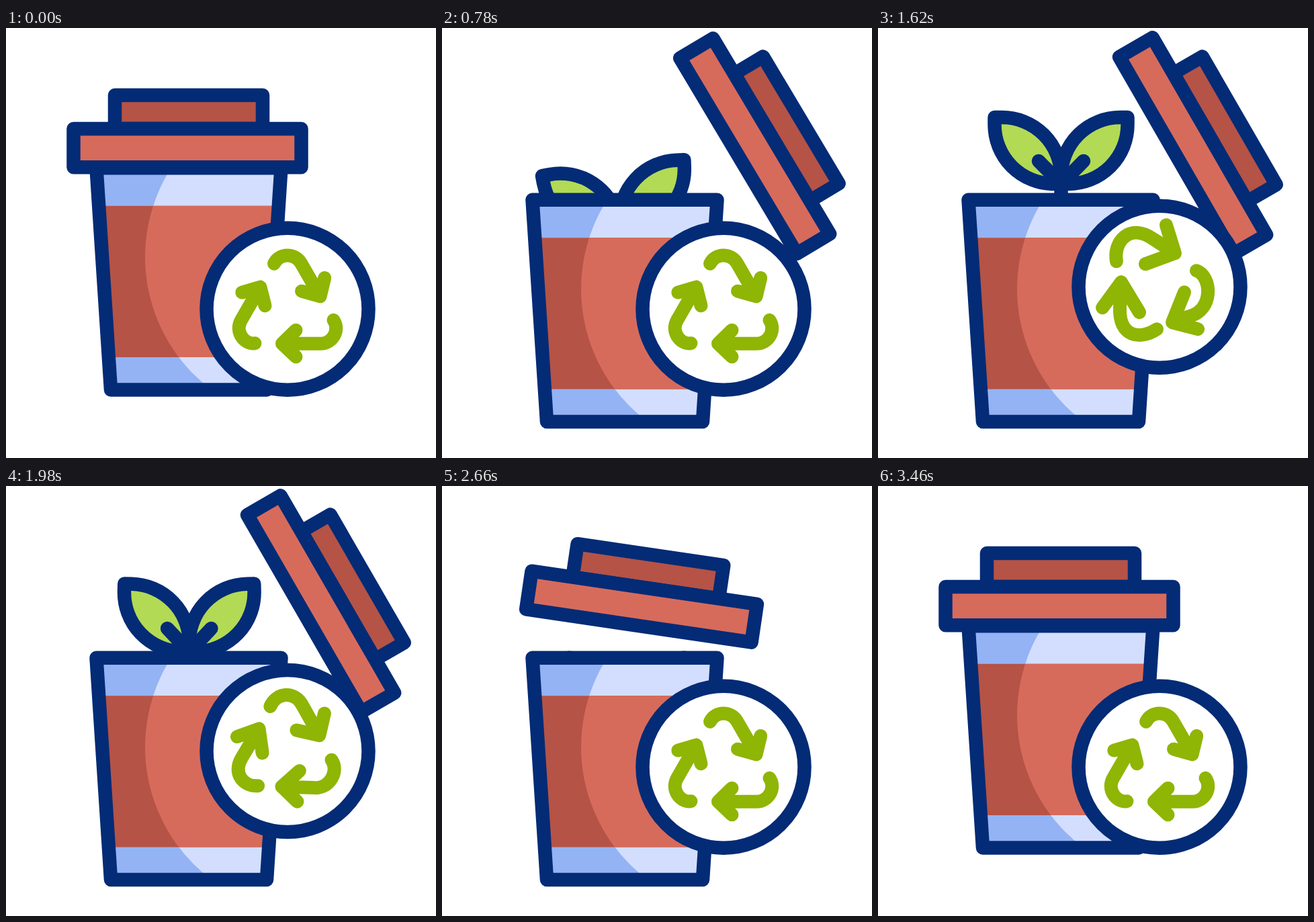
Write an HTML page that moves like this. It is 640x640 px and loops after 3.6 s.

```html
<!DOCTYPE html>
<html lang="en">
<head>
<meta charset="utf-8">
<title>Recyclable cup</title>
<style>
  html, body { margin: 0; width: 100%; height: 100%; overflow: hidden; background: #fff; }
  svg { display: block; width: 100vw; height: 100vh; }
  .line { stroke: #042b76; stroke-width: 20.5; stroke-linecap: round; stroke-linejoin: round; fill: none; }
  .arrows { stroke: #8fb505; stroke-width: 20; stroke-linecap: round; stroke-linejoin: round; fill: none; }
</style>
</head>
<body>
<svg viewBox="0 0 640 640">
  <defs>
    <clipPath id="aboveRim"><rect width="640" height="256"/></clipPath>
    <clipPath id="cupShape"><path d="M134.5 208.3H409.5L388 538.6H156Z"/></clipPath>
    <clipPath id="band"><rect x="120" y="264.7" width="300" height="225.3"/></clipPath>
    <g id="leaf" class="line">
      <path fill="#b2da54" d="M173.5 133H184.5A88 88 0 0 1 272.5 221V232H261.5A88 88 0 0 1 173.5 144Z"/>
      <path d="M239 198L272.5 232"/>
    </g>
  </defs>

  <g clip-path="url(#aboveRim)">
    <g id="plant">
      <path class="line" d="M272.5 232V290"/>
      <g id="leafL"><use href="#leaf"/></g>
      <g id="leafR"><use href="#leaf" transform="translate(545 0) scale(-1 1)"/></g>
    </g>
  </g>

  <g id="cup">
    <g clip-path="url(#cupShape)">
      <rect x="120" y="200" width="300" height="350" fill="#94b3f4"/>
      <circle cx="453.5" cy="341" r="246.5" fill="#d3deff"/>
      <g clip-path="url(#band)">
        <rect x="120" y="250" width="300" height="250" fill="#b55346"/>
        <circle cx="453.5" cy="341" r="246.5" fill="#d66b5c"/>
      </g>
    </g>
    <path class="line" d="M134.5 208.3H409.5L388 538.6H156Z"/>
  </g>

  <g id="lid" class="line">
    <path fill="#b55346" d="M162 150V100H382V150Z"/>
    <path fill="#d66b5c" d="M100.5 150H439.5V207.3H100.5Z"/>
  </g>

  <g id="badge">
    <circle class="line" style="fill:#fff" r="120.5"/>
    <g class="arrows"><path/><path/><path/></g>
  </g>
</svg>

<script>
const LOOP = 3600;
const $ = id => document.getElementById(id);
const paths = document.querySelectorAll('.arrows path');

// Eased progress from 0 to 1 between two times
const ease = (t, from, to) => {
  const x = Math.min(1, Math.max(0, (t - from) / (to - from)));
  return x * x * (3 - 2 * x);
};

const turn = ([x, y], deg) => {
  const a = deg * Math.PI / 180, c = Math.cos(a), s = Math.sin(a);
  return [x * c - y * s, x * s + y * c];
};

// Arrow points: tail, two curve handles, curve end, tip, inner barb, outer barb
const rest = [[68.5, 16.5], [78.6, 31.4], [67, 51.5], [49, 51.5], [-8, 51.5], [12.5, 31.5], [12.5, 71]];
const spun = [
  [[-4, 63], [-28, 79], [-61, 76], [-59, 30], [-57, -7], [-30, 38], [-85, 31]],
  [[-64, -38], [-69, -67], [-45, -96], [-9, -71], [23, -50], [-21, -34], [10, -92]],
  [[55, -24], [78, -16], [81, 35], [44, 44], [19, 53], [37, 8], [57, 63]]
];
// Same points with the rotation taken out, so they can be blended with the rest shape
const loose = spun.map((pts, k) => pts.map(p => turn(p, -120 * k - 90)));

function arrowPath(k, angle, blend) {
  const [tail, h1, h2, end, tip, inner, outer] = rest.map(([x, y], i) => {
    const [u, v] = loose[k][i];
    return turn([x + (u - x) * blend, y + (v - y) * blend], 120 * k + angle)
      .map(n => n.toFixed(2));
  });
  return `M${tail}C${h1} ${h2} ${end}L${tip}M${inner}L${tip}L${outer}`;
}

const move = (id, value) => $(id).setAttribute('transform', value);

function draw(t) {
  const drop = 47.5 * (ease(t, 0, 480) - ease(t, 2800, 3280));
  move('cup', `translate(0 ${drop})`);

  const lid = ease(t, 0, 840) - ease(t, 2240, 2790);
  move('lid', `translate(${220.4 * lid} ${9.4 * lid}) rotate(${60 * lid} 270 153.5)`);

  const leave = ease(t, 1840, 2520);
  const sink = 160 * (1 - ease(t, 480, 1020)) + 134 * leave;
  const sway = -22 + 28 * ease(t, 480, 1040) - 6 * ease(t, 1040, 1560);
  const open = 10 * (1 - ease(t, 480, 1040)) - 7 * ease(t, 1760, 2520);
  move('plant', `translate(${2.5 * leave} ${sink}) rotate(${sway} 272.5 300)`);
  move('leafL', `rotate(${-open} 272.5 232)`);
  move('leafR', `rotate(${open} 272.5 232)`);

  const lift = 33.5 * (ease(t, 840, 1680) - ease(t, 1680, 2520));
  move('badge', `translate(419 ${418.25 - lift})`);
  const angle = 120 * ease(t, 840, 2000);
  const blend = ease(t, 840, 1600) - ease(t, 1640, 2200);
  paths.forEach((p, k) => p.setAttribute('d', arrowPath(k, angle, blend)));
}

const start = performance.now();
function tick() {
  draw((performance.now() - start) % LOOP);
  requestAnimationFrame(tick);
}
tick();
</script>
</body>
</html>
```
